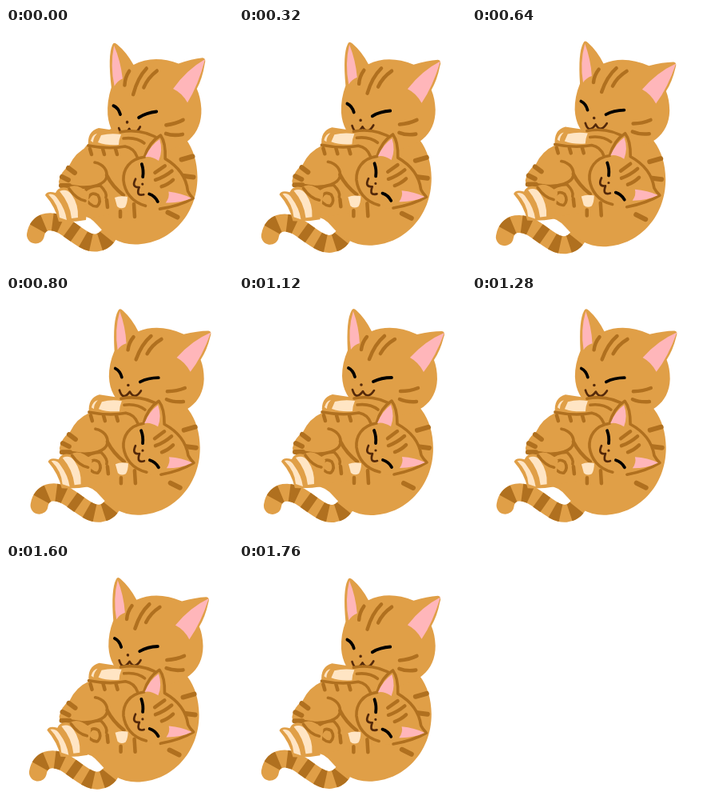
Recreate the animation shown at these times as an HTML page. Size 284x300 px, loop 1.92 s.

```html
<!DOCTYPE html>
<html lang="en">
<head>
<meta charset="utf-8">
<title>Cuddling cats</title>
<style>
  html, body { margin: 0; width: 100%; height: 100%; overflow: hidden; background: #fff; }
  svg { display: block; width: 100vw; height: 100vh; }
  path { fill: none; stroke-linecap: round; stroke-linejoin: round; }
  .fur { fill: #e09f47; }
  .furline { stroke: #e09f47; stroke-width: 22; }
  .mark { stroke: #b0701f; stroke-width: 4.5; }
  .wide { stroke: #b0701f; stroke-width: 6; }
  .edge { stroke: #b0701f; stroke-width: 3.6; }
  .band { stroke: #b0701f; stroke-width: 22; stroke-linecap: butt; }
  .pink { fill: #ffb6ba; }
  .cream { fill: #ffe5c4; }
  .eye { stroke: #000; stroke-width: 3.8; }
  .mouth { stroke: #54290a; stroke-width: 2.7; }
</style>
</head>
<body>
<svg viewBox="0 0 284 300" preserveAspectRatio="none">
  <g id="tail">
    <path class="furline" d="M42 262C45 243 64 241 82 254S108 273 118 272Q127 271 132 264"/>
    <path class="band" stroke-dasharray="11 11" stroke-dashoffset="-8" d="M42 262C45 243 64 241 82 254S108 273 118 272Q127 271 132 264"/>
  </g>

  <g id="body">
    <path class="fur" d="M86 190C90 150 130 118 190 120C222 124 243 152 243 190C243 238 208 274 165 274C145 274 130 264 118 250Q108 238 96 238Z"/>
    <path class="wide" d="M223 168L237 164M222 188L238 190M206 234L218 240"/>
  </g>

  <g id="head">
    <path class="fur" d="M136 68Q134 30 141 18Q143 14 147 18Q158 28 166 44Q192 34 223 48Q240 44 254 44Q259 45 256 52Q252 68 244 80Q248 90 248 104C247 135 222 150 190 150C160 150 130 135 129 100Q129 84 136 68Z"/>
    <path class="pink" d="M143 19Q150 38 151 59Q144 61 140 67Q136 42 143 19ZM257 46Q233 56 214 77Q225 83 231 95Q246 76 257 46Z"/>
    <path class="mark" d="M160 51Q154 58 153 67M182 50Q170 60 163 79M195 54Q183 61 177 72M202 119Q214 119 224 115M201 129Q210 133 222 132"/>
    <path class="eye" d="M137 90Q143 93 145 101M168 107Q178 102 191 102"/>
    <path class="mouth" d="M142 117Q146 131 155 119Q161 130 169 118"/>
    <circle cx="153" cy="111" r="1.8" fill="#54290a"/>
  </g>

  <g id="arms">
    <path class="fur" d="M67 190Q69 178 80 170Q88 153 104 146Q102 127 117 123L150 128Q190 126 200 150L170 225L110 235L83 204Q68 201 67 190Z"/>
    <path class="edge" d="M144 128Q172 123 194 138M148 136Q164 134 174 142M104 145Q130 150 150 146Q161 148 165 159"/>
    <path class="cream" d="M120 132Q132 129 145 131Q142 138 142 144Q127 145 116 141ZM107 139Q109 131 115 130Q110 135 110 141Z"/>
    <path class="mark" d="M106 149L108 156M122 149L124 156M138 149L140 156"/>
    <path class="wide" d="M79 173L87 179M71 184L79 188M70 195L80 195"/>
    <path class="edge" d="M112 166C123 168 128 176 127 184C125 194 108 198 94 197L80 195M98 203Q104 196 119 195Q128 204 126 210M104 210Q108 202 116 207Q121 215 115 221Q106 222 98 207"/>
    <path class="mark" d="M127 213L128 222M144 227L144 234M161 218L162 234M127 182Q134 196 148 207"/>
    <path class="cream" d="M137 210Q144 207 153 209Q153 217 150 222Q144 225 140 221Z"/>
  </g>

  <g id="feet">
    <path class="fur" d="M53 207Q55 201 66 204Q70 195 81 198Q92 190 108 205L104 238Q88 241 70 240Q66 222 53 207Z"/>
    <path class="cream" d="M57 206Q64 204 69 212Q78 224 80 238L71 235Q70 219 57 206ZM71 202Q80 198 86 206Q95 219 94 235L86 236Q84 217 71 202Z"/>
    <path class="edge" d="M83 199Q92 212 103 214"/>
  </g>

  <g id="kitten">
    <path class="fur" d="M172 159C153 162 146 176 147 189C149 210 166 224 188 224C210 224 225 216 235 208Q224 174 198 160Q198 140 191 131Q177 140 172 159Z"/>
    <path class="edge" d="M172 159C153 162 146 176 147 189C149 203 158 216 176 220M194 223Q219 218 235 208Q230 203 228 199Q224 174 198 160Q198 140 191 131Q177 140 172 159"/>
    <path class="pink" d="M190 136Q195 150 190 163Q180 157 173 159Q179 144 190 136ZM204 201Q220 202 233 208Q219 215 201 215Q206 208 204 201Z"/>
    <path class="mark" d="M186 178L198 169M187 187Q198 183 207 175M195 195Q203 192 209 186"/>
    <path class="eye" d="M169 168Q172 176 171 184M180 205Q187 207 191 214"/>
    <path class="mouth" d="M162 187Q157 198 167 197Q163 209 173 206"/>
    <circle cx="171" cy="193" r="1.6" fill="#54290a"/>
  </g>
</svg>
<script>
  const STEP = 160, STEPS = 12;
  const move = (id, transform) =>
    document.getElementById(id).setAttribute('transform', transform);

  // The shapes are drawn leaning fully right; q = 1 brings them back to the left.
  function pose(q) {
    move('tail', `translate(${-5 * q} ${-3.5 * q})`);
    move('body', `translate(${-3.5 * q} ${-3.5 * q})`);
    move('head', `matrix(${1 - .018 * q} ${-.0995 * q} ${.0717 * q} ${1 + .053 * q} ${-6.6 * q} ${16.1 * q})`);
    move('arms', `translate(${-q} ${2 * q})`);
    move('feet', `translate(${-4 * q} ${2 * q})`);
    move('kitten', `translate(0 ${3 * q}) rotate(${2.5 * q} 190 187)`);
  }

  function frame() {
    const step = Math.floor(performance.now() / STEP) % STEPS;
    pose(1 - Math.sin(Math.PI * step / (STEPS + 1)) ** 1.3);
    requestAnimationFrame(frame);
  }
  frame();
</script>
</body>
</html>
```
